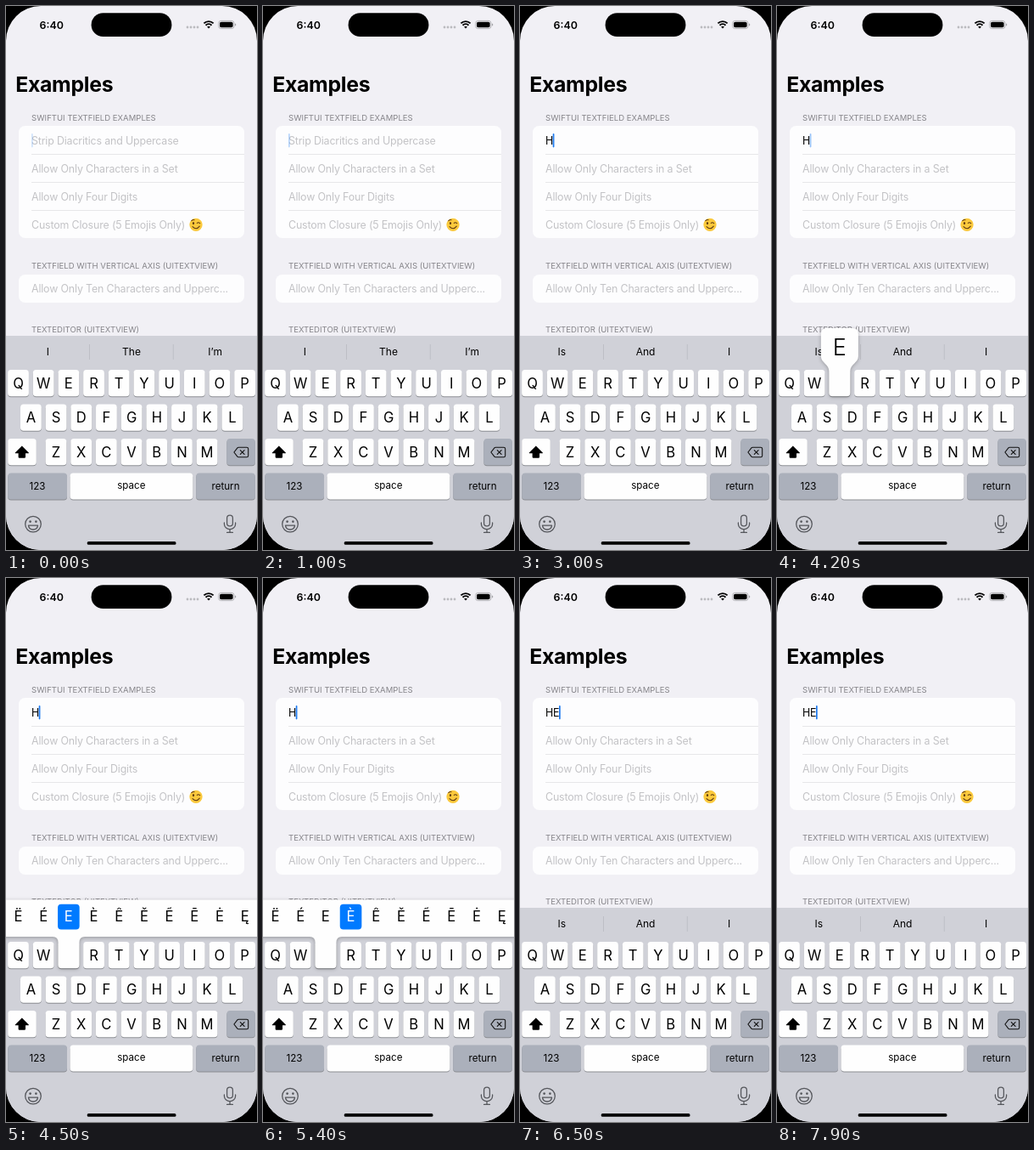
An HTML page that plays this animation: 296x640 px, repeating every 8000 ms.

```html
<!DOCTYPE html>
<html lang="en">
<head>
<meta charset="utf-8">
<title>Text field examples</title>
<style>
html, body { margin: 0; width: 100%; height: 100%; overflow: hidden; background: #000; }
svg { display: block; width: 296px; height: 640px; border-radius: 41px; background: #f1f0f5;
  font-family: Inter, Roboto, "Liberation Sans", sans-serif; font-optical-sizing: none; }
.mid { text-anchor: middle; }
.head { font-size: 9.5px; letter-spacing: .05px; fill: #86858a; }
.row { font-size: 12.4px; letter-spacing: -.15px; }
.hint { fill: #c3c3c6; }
.key { font-size: 16.6px; }
.label { font-size: 11.6px; }
.word { font-size: 12px; }
.pop { fill: #fefefe; filter: drop-shadow(0 1px 2px rgba(0, 0, 0, .28)); }
.line { fill: none; stroke: #55575c; stroke-width: 1.3; stroke-linecap: round; stroke-linejoin: round; }
</style>
</head>
<body>
<svg id="stage" viewBox="0 0 296 640"></svg>
<script>
const rect = (x, y, w, h, r, fill, more = '') =>
  `<rect x="${x}" y="${y}" width="${w}" height="${h}" rx="${r}" fill="${fill}" ${more}/>`;
const text = (x, y, cls, str, more = '') => `<text x="${x}" y="${y}" class="${cls}" ${more}>${str}</text>`;
const path = (d, more = '') => `<path d="${d}" ${more}/>`;
const dot = (x, y, r, fill) => `<circle cx="${x}" cy="${y}" r="${r}" fill="${fill}"/>`;
const keyBox = (x, y, w, fill = '#fefefe') =>
  rect(x, y + 1, w, 31.2, 3.8, '#8b8d92') + rect(x, y, w, 31.2, 3.8, fill);

const PITCH = 29.68, GREY = '#abb0bb', BLUE = '#007aff';
const colX = i => 14.5 + PITCH * i;
const keyRow = (letters, x, y) => [...letters].map((c, i) => {
  const cx = x + PITCH * i;
  return keyBox(cx - 12.4, y, 24.8) + text(cx, y + 21.6, 'key mid', c);
}).join('');

const statusBar = () =>
  text(39.5, 26.6, '', '6:40', 'font-size="12.4" font-weight="600"') +
  rect(100.6, 8.3, 94.8, 27.8, 13.9, '#000') +
  [214, 218, 222, 226].map(x => dot(x, 25, 1.4, '#bbbbbf')).join('') +
  path('M233.4 20.4a8 8 0 0 1 11.2 0M235.5 22.7a5 5 0 0 1 7 0', 'fill="none" stroke="#000" stroke-width="1.9"') +
  path('M239 26.6l-1.9-2a2.7 2.7 0 0 1 3.8 0z') +
  rect(250.6, 17.4, 18.4, 9.2, 3, 'none', 'stroke="#a5a5a9" stroke-width=".8"') +
  rect(252, 18.8, 15.6, 6.4, 1.8, '#000') +
  path('M270 20.5q1.3 .4 1.3 1.5t-1.3 1.5z', 'fill="#a5a5a9"');

const emoji = () =>
  dot(224, 257.4, 7.6, '#fbc93c') +
  `<ellipse cx="221" cy="255.6" rx="1.1" ry="1.6" fill="#5f3a12"/>` +
  path('M225.3 255.4q1.7-1.4 3.4 .3M220 259.6q4.4 4.6 8.2-.4M218.8 252.6q1.6-1.5 3.2-.9',
    'fill="none" stroke="#5f3a12" stroke-width="1.1" stroke-linecap="round"');

const form = () =>
  text(11.2, 100.8, '', 'Examples', 'font-size="24.8" font-weight="700" letter-spacing="-.3"') +
  text(30, 134.5, 'head', 'SWIFTUI TEXTFIELD EXAMPLES') +
  text(30, 309.4, 'head', 'TEXTFIELD WITH VERTICAL AXIS (UITEXTVIEW)') +
  text(30, 384.4, 'head', 'TEXTEDITOR (UITEXTVIEW)') +
  rect(15, 141, 266, 132, 7.5, '#fdfdfe') +
  rect(15, 316, 266, 33, 7.5, '#fdfdfe') +
  [174, 207, 240].map(y => rect(30, y, 251, .7, 0, '#dedee1')).join('') +
  ['Allow Only Characters in a Set', 'Allow Only Four Digits', 'Custom Closure (5 Emojis Only)']
    .map((s, i) => text(30, 195.8 + 33 * i, 'row hint', s)).join('') +
  text(30, 337.3, 'row hint', 'Allow Only Ten Characters and Upperc...') +
  emoji();

const keyboard = () =>
  rect(0, 388, 296, 252, 0, '#d0d1d8') +
  [98.2, 196.8].map(x => rect(x, 398, .8, 18, 0, '#b8bac1')).join('') +
  keyRow('QWERTYUIOP', colX(0), 428) +
  keyRow('ASDFGHJKL', 29.4, 468.5) +
  keyRow('ZXCVBNM', 59, 509) +
  keyBox(2.2, 509, 33.6) +
  path('M18.8 517.6l8 7.8q.6.8-.4.8H23v4.4q0 1.2-1.2 1.2h-6q-1.2 0-1.2-1.2v-4.4h-3.4q-1 0-.4-.8z') +
  keyBox(260.4, 509, 33.4, GREY) +
  path('M274.3 519.2h9.6q1.8 0 1.8 1.8v8q0 1.8-1.8 1.8h-9.6q-.8 0-1.4-.6l-4-5.2 4-5.2q.6-.6 1.4-.6zM276.3 522.6l4.8 4.8m0-4.8l-4.8 4.8',
    'class="line" style="stroke:#111;stroke-width:1.1"') +
  keyBox(2.2, 549.4, 69.8, GREY) + text(37, 569.2, 'label mid', '123') +
  keyBox(75.5, 549.4, 144.8) + text(147.8, 568.2, 'label mid', 'space') +
  keyBox(224.2, 549.4, 69.6, GREY) + text(259, 569.2, 'label mid', 'return') +
  `<circle cx="32" cy="609.6" r="9.3" class="line"/>` +
  dot(28.6, 606.6, 1.3, '#55575c') + dot(35.4, 606.6, 1.3, '#55575c') +
  path('M26.4 611.2h11.2q-.8 4.8-5.6 4.8t-5.6-4.8z', 'class="line"') +
  rect(260.6, 599.2, 6.8, 12.6, 3.4, 'none', 'class="line"') +
  path('M257.4 608v1.4a6.6 6.2 0 0 0 13.2 0V608M264 615.8v3.6m-3.4 0h6.8', 'class="line"') +
  rect(95.6, 630, 105, 3.8, 1.9, '#000');

// Enlarged key cap; (0, 0) is the top middle of its key.
const popup = (id, letter, x, y) =>
  `<g id="${id}" transform="translate(${x} ${y})">` +
  path('M-22-42q0-7 7-7h30q7 0 7 7v26c0 8-9.6 9-9.6 18v25q0 4-4 4h-16.8q-4 0-4-4v-25c0-9-9.6-10-9.6-18z', 'class="pop"') +
  text(0, -17, 'mid', letter, 'font-size="27" font-weight="300"') + '</g>';

const ACCENTS = 'ËÉEÈÊĚẼĒĖĘ';
const accentBar = () => '<g id="bar">' +
  path('M-4 378.5H300V422H93Q86.4 422 86.4 429V455q0 4-4 4H65.6q-4 0-4-4V429Q61.6 422 55 422H-4z', 'class="pop"') +
  rect(-12.8, 383.8, 25.6, 29.6, 4, BLUE, 'id="pick"') +
  [...ACCENTS].map((c, i) => text(colX(i), 404.2, 'key mid accent', c)).join('') + '</g>';

const stage = document.getElementById('stage');
stage.innerHTML = statusBar() + form() +
  text(30, 162.8, 'row', '', 'id="field"') +
  rect(0, 150, 1.7, 16.4, .8, '#1a78f0', 'id="caret"') +
  keyboard() +
  [49.3, 148, 246.6].map(x => text(x, 411.3, 'word mid', '')).join('') +
  popup('popH', 'H', 29.4 + PITCH * 5, 468.5) + popup('popE', 'E', colX(2), 428) + accentBar();

const el = id => document.getElementById(id);
const words = stage.querySelectorAll('.word');
const accents = stage.querySelectorAll('.accent');
const show = (id, on) => el(id).setAttribute('visibility', on ? 'visible' : 'hidden');

// Caret fades: start time, then the opacity of each 100 ms step.
const OUT = [.7, .3, 0], IN = [.5, 1];
const FADES = [[0, .2, 0], [300, ...IN], [900, ...OUT], [1300, ...IN], [2000, .65, 0], [2300, ...IN],
  [3700, ...OUT], [4200, .45, 1], [4700, ...OUT], [5200, .3, .7, 1], [5800, ...OUT],
  [6200, ...IN], [7400, ...OUT], [7800, ...IN]];
const caretAlpha = t => {
  const [start, ...steps] = FADES.filter(f => f[0] <= t).pop();
  return steps[Math.min((t - start) / 100, steps.length - 1)];
};

function draw(now) {
  const t = Math.floor(now % 8000 / 100) * 100;
  const typed = t < 2800 ? '' : t < 6400 ? 'H' : 'HE';
  const field = el('field');
  field.textContent = typed || 'Strip Diacritics and Uppercase';
  field.setAttribute('class', typed ? 'row' : 'row hint');
  el('caret').setAttribute('x', [30, 38.7, 46][typed.length]);
  el('caret').setAttribute('opacity', caretAlpha(t));

  const hints = t < 2900 ? ['I', 'The', 'I’m'] : ['Is', 'And', 'I'];
  words.forEach((w, i) => w.textContent = hints[i]);

  show('popH', t >= 2500 && t < 2800);
  show('popE', t >= 3900 && t < 4300);
  show('bar', t >= 4300 && t < 6400);
  const pick = t >= 5000 && t < 5600 ? 3 : 2;
  el('pick').setAttribute('transform', `translate(${colX(pick)} 0)`);
  accents.forEach((a, i) => a.setAttribute('fill', i === pick ? '#fff' : '#000'));
  requestAnimationFrame(() => draw(performance.now() - begin));
}
const begin = performance.now();
draw(0);
</script>
</body>
</html>
```
